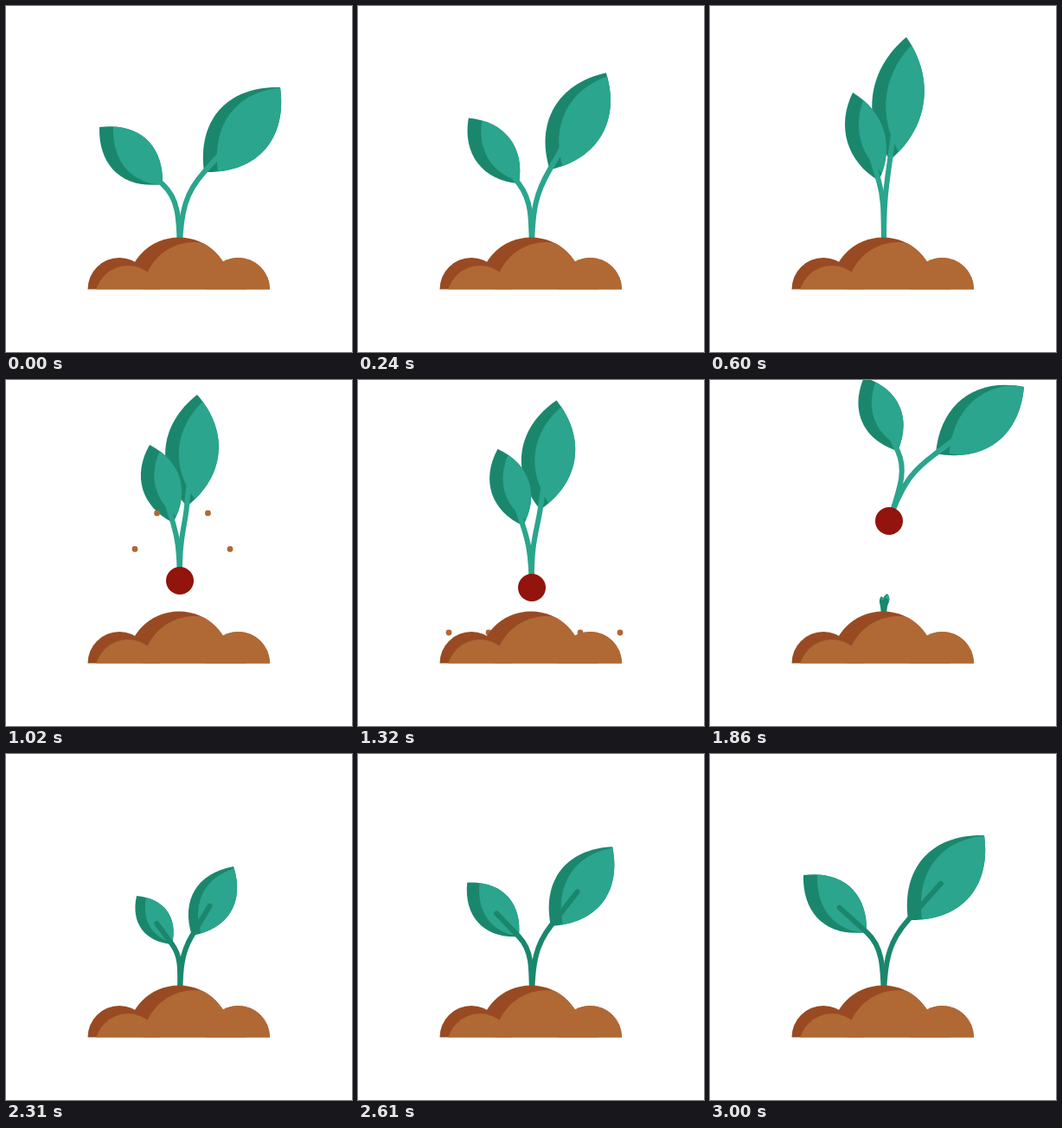
Write an HTML page with a canvas that moves like this. It is 400 by 400 pixels and loops after 5630 ms.

```html
<!DOCTYPE html>
<html lang="en">
<head>
<meta charset="utf-8">
<title>Sprout</title>
<style>
html, body { margin: 0; width: 100%; height: 100%; overflow: hidden; background: #fff; }
canvas { display: block; width: 100vmin; height: 100vmin; }
</style>
</head>
<body>
<canvas id="stage" width="400" height="400"></canvas>
<script>
const ctx = document.getElementById('stage').getContext('2d');
const LOOP = 5630, STEP = 30, REST = 3000;
const LIGHT = '#2ba58d', DARK = '#1a876d', RADISH = '#92140c';
const SOIL = '#b06835', SOIL_DARK = '#994a22';

// Pose: root x,y | left leaf base, tip | right leaf base, tip | leaf half-width ratio
const grown = [201, 292, 181, 206, 108, 140, 229, 192, 317, 94, 0.265];
const pulled = [
  [0, grown],
  [600, [201, 284, 195, 202, 165, 100, 208, 178, 227, 36, 0.207]],
  [1020, [201, 232, 193, 165, 166, 75, 209, 146, 221, 17, 0.237]],
  [1590, [201, 251, 188, 174, 153, 89, 213, 156, 246, 35, 0.243]],
  [1700, [201, 254, 186, 176, 146, 97, 216, 158, 262, 42, 0.25]],
  [1860, [207, 163, 217, 82, 178, -3, 261, 85, 363, 8, 0.25]],
  [2160, [420, -70, 480, -130, 500, -220, 510, -105, 620, -80, 0.25]]
];
const regrown = [
  [1800, [201, 292, 200, 288, 198, 276, 202, 288, 205, 272, 0.25]],
  [1860, [201, 292, 200, 262, 198, 250, 202, 262, 205, 247, 0.25]],
  [2310, [201, 292, 192, 220, 151, 164, 215, 210, 263, 130, 0.26]],
  [REST, grown]
];

// Monotone cubic interpolation between keyed poses
function poseAt(keys, t) {
  const last = keys.length - 1;
  if (t >= keys[last][0]) return keys[last][1];
  let i = 0;
  while (t >= keys[i + 1][0]) i++;
  const span = keys[i + 1][0] - keys[i][0], u = (t - keys[i][0]) / span;
  return keys[i][1].map((from, c) => {
    const slope = k => (keys[k + 1][1][c] - keys[k][1][c]) / (keys[k + 1][0] - keys[k][0]);
    const tangent = k => {
      if (k === 0 || k === last) return 0;
      const a = slope(k - 1), b = slope(k);
      return a * b > 0 ? 2 * a * b / (a + b) : 0;
    };
    const to = keys[i + 1][1][c], ease = u * u * (3 - 2 * u);
    return from + (to - from) * ease +
      span * u * (1 - u) * (tangent(i) * (1 - u) - tangent(i + 1) * u);
  });
}

function disc(x, y, r, color) {
  ctx.fillStyle = color;
  ctx.beginPath();
  ctx.arc(x, y, r, 0, 2 * Math.PI);
  ctx.fill();
}

function leaf(bx, by, tx, ty, width, fullLength) {
  const dx = tx - bx, dy = ty - by, length = Math.hypot(dx, dy);
  const at = (along, side) => [bx + dx * along - dy * side, by + dy * along + dx * side];
  const bulge = width * 4 / 3;
  const outline = new Path2D();
  outline.moveTo(bx, by);
  outline.bezierCurveTo(...at(0.3, bulge), ...at(0.7, bulge), tx, ty);
  outline.bezierCurveTo(...at(0.7, -bulge), ...at(0.3, -bulge), bx, by);
  ctx.fillStyle = DARK;
  ctx.fill(outline);
  ctx.save();
  ctx.clip(outline);
  ctx.translate(16 * Math.min(1, length / fullLength), 0);
  ctx.fillStyle = LIGHT;
  ctx.fill(outline);
  ctx.restore();
}

function branch(rx, ry, lean, bx, by, tx, ty) {
  const reach = Math.hypot(bx - rx, by - ry);
  const dx = tx - bx, dy = ty - by, length = Math.hypot(dx, dy);
  const back = 0.27 * reach / length;
  ctx.beginPath();
  ctx.moveTo(rx, ry);
  ctx.bezierCurveTo(
    rx + Math.cos(lean) * reach * 0.57, ry + Math.sin(lean) * reach * 0.57,
    bx - dx * back, by - dy * back, bx, by);
  ctx.lineTo(bx + dx * 0.43, by + dy * 0.43);
  ctx.stroke();
}

function plant(pose, stemColor) {
  const [rx, ry, ...rest] = pose;
  const left = rest.slice(0, 4), right = rest.slice(4, 8), width = rest[8];
  leaf(...right, width, 132);
  leaf(...left, width, 97);
  const lean = Math.atan2(left[1] * 0.6 + right[1] * 0.4 - ry, left[0] * 0.6 + right[0] * 0.4 - rx);
  ctx.strokeStyle = stemColor;
  ctx.lineWidth = 6;
  ctx.lineCap = ctx.lineJoin = 'round';
  branch(rx, ry, lean, ...left);
  branch(rx, ry, lean, ...right);
  disc(rx, ry, 16, RADISH);
}

function crumbs(t) {
  if (t < 695 || t > 1680) return;
  const p = Math.min(1, (t - 695) / 585);
  for (const [reach, height] of [[99, 87], [53, 129]]) {
    const y = 268 + 24 * p - 4 * height * p * (1 - p);
    for (const side of [-1, 1]) disc(204 + side * reach * p, y, 3.4, SOIL);
  }
}

function mound() {
  const bumps = new Path2D();
  for (const [x, r] of [[131, 36.5], [200, 60], [268.5, 36.5]]) {
    bumps.moveTo(x + r, 327.5);
    bumps.arc(x, 327.5, r, 0, Math.PI, true);
    bumps.closePath();
  }
  ctx.fillStyle = SOIL_DARK;
  ctx.fill(bumps);
  ctx.save();
  ctx.clip(bumps);
  disc(141, 338, 38, SOIL);
  disc(218, 333, 60, SOIL);
  disc(268.5, 327.5, 38, SOIL);
  ctx.restore();
}

function draw(now) {
  const t = Math.min(REST, Math.floor(now % LOOP / STEP) * STEP);
  ctx.fillStyle = '#fff';
  ctx.fillRect(0, 0, 400, 400);
  if (t >= regrown[0][0]) plant(poseAt(regrown, t), DARK);
  if (t < 2160) plant(poseAt(pulled, t), LIGHT);
  crumbs(t);
  mound();
}

const start = performance.now();
function tick() {
  draw(performance.now() - start);
  requestAnimationFrame(tick);
}
tick();
</script>
</body>
</html>
```
